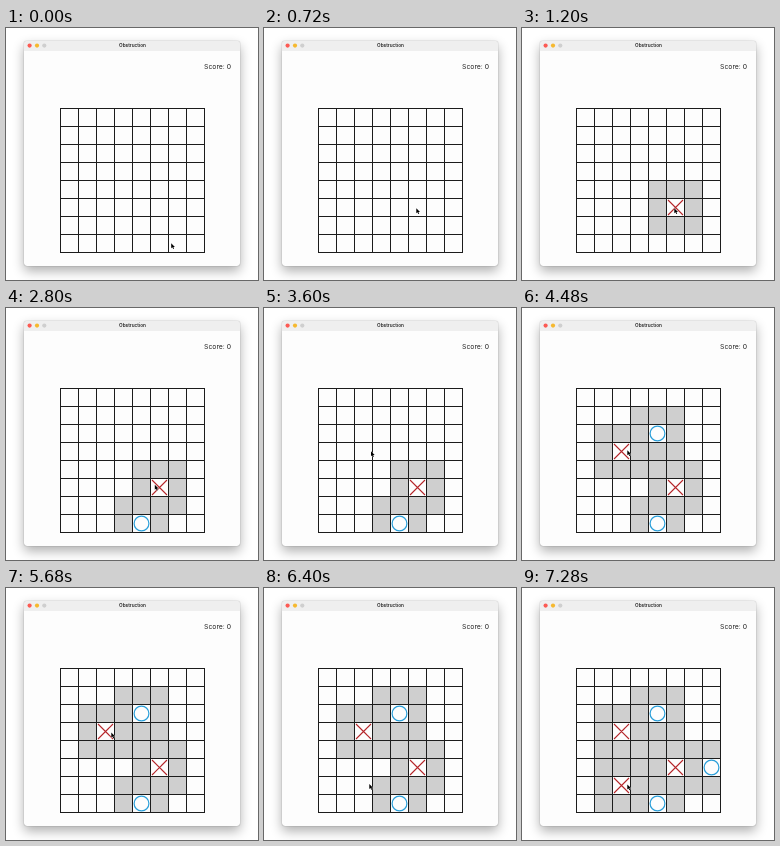
Write an HTML page that moves like this. It is 252 by 252 pixels and loops after 8 s.

```html
<!DOCTYPE html>
<html lang="en">
<head>
<meta charset="utf-8">
<title>Obstruction</title>
<style>
  html, body { margin: 0; width: 100%; height: 100%; overflow: hidden; background: #fff; }
  #stage { position: relative; width: 252px; height: 252px; overflow: hidden; }
  #window {
    position: absolute; left: 18px; top: 13px; width: 216px; height: 225px;
    border-radius: 3px; background: #fdfdfd; overflow: hidden;
    box-shadow: 0 0 1px rgba(0,0,0,.55), 0 5px 12px rgba(0,0,0,.32);
  }
  #bar { height: 9.5px; background: #efefef; }
  svg { position: absolute; left: 0; top: 0; }
  text { font-family: Inter, "Open Sans", sans-serif; fill: #222; }
</style>
</head>
<body>
<div id="stage">
  <div id="window"><div id="bar"></div></div>
  <svg width="252" height="252" viewBox="0 0 252 252">
    <circle cx="23.6" cy="17.6" r="2.1" fill="#fc5b54"/>
    <circle cx="31" cy="17.6" r="2.1" fill="#f6b92f"/>
    <circle cx="38.3" cy="17.6" r="2.1" fill="#cfcfcf"/>
    <text x="126.5" y="19.2" font-size="4.7" font-weight="600" text-anchor="middle">Obstruction</text>
    <text x="225" y="40.6" font-size="6.8" text-anchor="end">Score: 0</text>
    <g id="shade" fill="#cfcfcf"></g>
    <path id="grid" stroke="#1c1c1c" fill="none"/>
    <g id="marks" fill="none"></g>
    <path id="cursor" d="M0 0V5L1.2 4L2 5.8L2.9 5.4L2.1 3.7H3.7Z"
      fill="#000" stroke="#fff" stroke-width=".5" paint-order="stroke"/>
  </svg>
</div>
<script>
const LOOP = 8000, STEP = 80;
const LEFT = 54.5, TOP = 80.5, CELL = 18, SIZE = 8;

// time, player, column, row
const moves = [
  [1200, "X", 5, 5],
  [1920, "O", 4, 7],
  [3760, "X", 2, 3],
  [4480, "O", 4, 2],
  [6480, "X", 2, 6],
  [7280, "O", 7, 5]
];

// time, x, y of the pointer tip
const path = [
  [0, 165.2, 215.2],
  [720, 152.3, 180.3],
  [2720, 152.3, 180.3],
  [2800, 148.8, 176.8],
  [3600, 107, 143.2],
  [3680, 105.3, 142.3],
  [5600, 105.3, 142.3],
  [5680, 105.3, 144.6],
  [6400, 105.3, 196],
  [6560, 105.3, 196],
  [6640, 105.3, 196.4],
  [8000, 105.3, 196.4]
];

const $ = id => document.getElementById(id);

function add(parent, tag, attrs) {
  const el = document.createElementNS("http://www.w3.org/2000/svg", tag);
  for (const key in attrs) el.setAttribute(key, attrs[key]);
  return parent.appendChild(el);
}

let lines = "";
for (let i = 0; i <= SIZE; i++) {
  const d = i * CELL, span = SIZE * CELL;
  lines += `M${LEFT + d} ${TOP - .5}v${span + 1}M${LEFT - .5} ${TOP + d}h${span + 1}`;
}
$("grid").setAttribute("d", lines);

const taken = (c, r) => moves.some(m => m[2] === c && m[3] === r);
const timed = [];

for (const [time, player, col, row] of moves) {
  for (let r = Math.max(0, row - 1); r <= Math.min(SIZE - 1, row + 1); r++)
    for (let c = Math.max(0, col - 1); c <= Math.min(SIZE - 1, col + 1); c++)
      if (!taken(c, r)) timed.push([time, add($("shade"), "rect", {
        x: LEFT + c * CELL, y: TOP + r * CELL, width: CELL, height: CELL
      })]);

  const x = LEFT + (col + .5) * CELL, y = TOP + (row + .5) * CELL;
  const mark = player === "X"
    ? add($("marks"), "path", {
        d: `M${x - 7.5} ${y - 7.5}l15 15m0 -15l-15 15`, stroke: "#b5262b", "stroke-width": 1.1
      })
    : add($("marks"), "circle", {
        cx: x, cy: y, r: 7.4, fill: "#fdfdfd", stroke: "#2b9fd9", "stroke-width": 1.2
      });
  timed.push([time, mark]);
}

function pointer(t) {
  const i = Math.max(1, path.findIndex(p => p[0] >= t));
  const [t0, x0, y0] = path[i - 1], [t1, x1, y1] = path[i];
  const k = (t - t0) / (t1 - t0);
  const e = k + (k * k * (3 - 2 * k) - k) * .6;
  return [x0 + (x1 - x0) * e, y0 + (y1 - y0) * e];
}

function draw() {
  const t = Math.floor(performance.now() % LOOP / STEP) * STEP;
  for (const [time, el] of timed) el.style.display = t >= time ? "" : "none";
  $("cursor").setAttribute("transform", `translate(${pointer(t)})`);
  requestAnimationFrame(draw);
}
draw();
</script>
</body>
</html>
```
